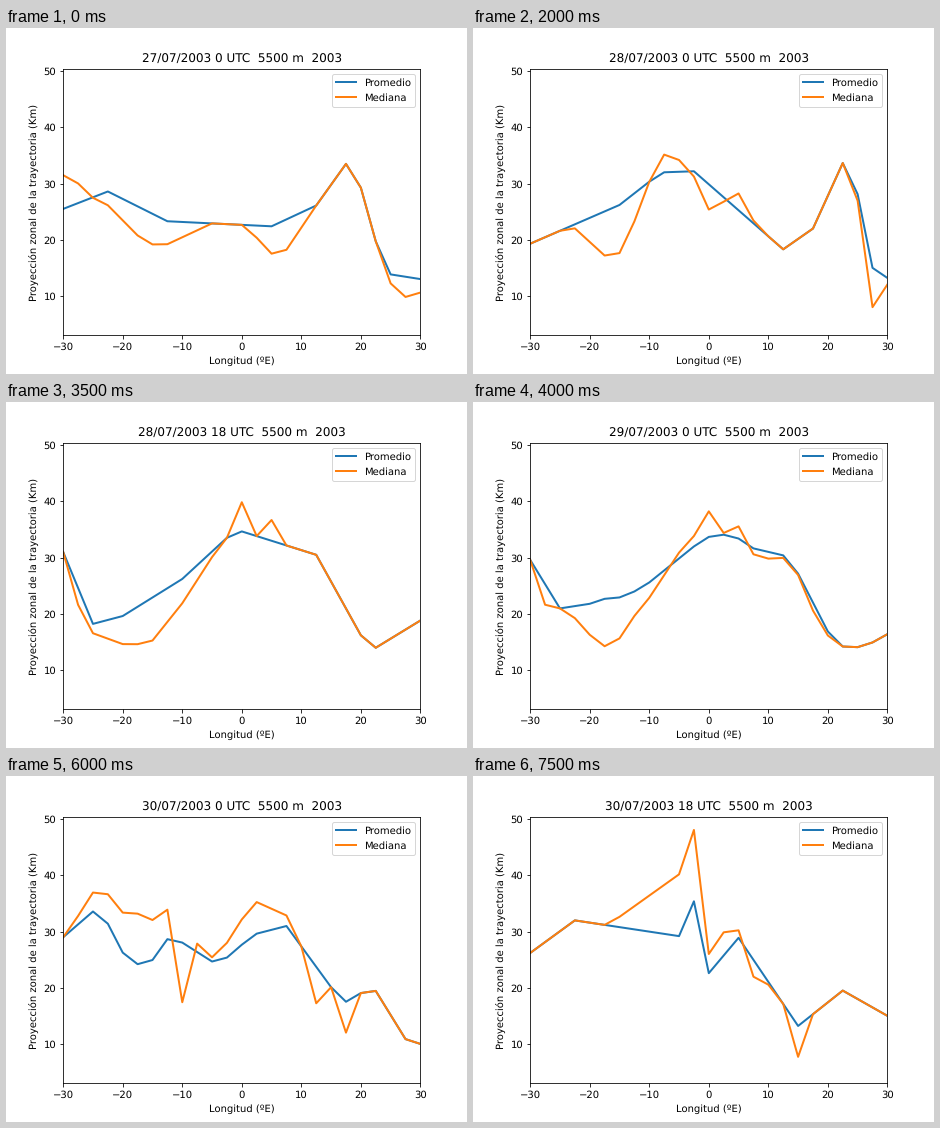
Recreate the animation shown at these times as a matplotlib script. Size 461 by 346 pixels, loop 8 s.

```python
import numpy as np
import matplotlib.pyplot as plt
from matplotlib.animation import FuncAnimation

W, H, DPI = 461, 346, 72
FRAMES, STEP_MS = 16, 500

plt.rcParams.update({"font.family": "DejaVu Sans", "text.hinting": "none"})
lon = np.linspace(-30, 30, 25)
steps, means, medians = [], [], []


def tent(center, height, reach):
    """Triangular bump that falls to zero at the given reach."""
    return height * np.clip(1 - abs(lon - center) / reach, 0, None)


def pose(step, outline, *bumps):
    """Mean follows a few (lon, km) points; the median departs from it in bumps."""
    mean = np.interp(lon, *zip(*outline))
    steps.append(step)
    means.append(mean)
    medians.append(mean + sum(tent(*b) for b in bumps))


pose(0, [(-30, 25.5), (-22.5, 28.6), (-12.5, 23.3), (5, 22.4), (12.5, 26.1),
         (18.5, 35), (24, 14), (30, 13)],
     (-30, 6, 6), (-16, -6, 11), (6.5, -6.5, 6), (28, -4, 5))
pose(2, [(-30, 23.6), (-17.5, 25.3), (-11.5, 30.3), (-5, 24.9), (10, 21),
         (21, 34.5), (27, 10), (30, 10)],
     (-18, -8, 11), (2.5, 3.5, 5), (7.5, -3, 4), (20, 5.5, 5))
pose(4, [(-30, 19.3), (-15, 26.2), (-8, 32), (-2.5, 32.2), (12.5, 18.3),
         (17.5, 22), (23.5, 36), (27.5, 15), (30, 13.2)],
     (-16, -10, 7), (-7, 3.5, 5), (0, -4.5, 3.5), (5, 3, 3), (27.5, -7, 3))
pose(7, [(-30, 31), (-25, 18.2), (-20, 19.6), (-10, 26.2), (-1, 35),
         (12.5, 30.5), (21.5, 13.3), (30, 18.8)],
     (-27.5, -3, 2.5), (-15.5, -8, 12), (0, 5.2, 2.5), (5, 3.7, 2.5))
pose(10, [(-30, 26.8), (-18, 26), (-14, 21.9), (-2.5, 28.9), (3.75, 36),
          (7.5, 30.6), (15, 30), (20, 18.2), (26, 9.6), (30, 11.5)],
     (-27.5, -5, 2.5), (-24.5, 4, 3), (-17.5, -12, 5.5), (-3.5, 6.5, 7),
     (9, -4.5, 5), (18, -5, 3.5))
pose(12, [(-30, 29), (-24, 34.5), (-19, 24.2), (-15.5, 24.2), (-12, 29.4),
          (-4, 24), (2, 29.5), (7.5, 31), (17, 17.2), (22, 20.3), (28, 10)],
     (-17.5, 9, 12), (-10, -14, 2.5), (2, 6, 8), (12.5, -6.5, 2.5),
     (17.5, -5.5, 2.5))
pose(15, [(-30, 26.2), (-22.5, 32), (-5, 29.2), (-2.5, 35.4), (0, 22.6),
          (5, 28.9), (15, 13.2), (22.5, 19.5), (30, 15)],
     (-5, 11, 12), (-2.5, 4, 2.5), (0, -3, 2.5), (7.5, -3, 3), (15, -5.5, 2.5))


def blend(curves, step):
    """Interpolate between the two nearest poses."""
    return [np.interp(step, steps, column) for column in zip(*curves)]


fig, ax = plt.subplots(figsize=(W / DPI, H / DPI), dpi=DPI)
fig.subplots_adjust(left=57.2 / W, right=414.4 / W,
                    top=1 - 41.3 / H, bottom=1 - 307.4 / H)
mean_line, = ax.plot(lon, means[0], lw=2, label="Promedio")
median_line, = ax.plot(lon, medians[0], lw=2, label="Mediana")
ax.set(xlim=(-30, 30), ylim=(2.97, 50.36), yticks=range(10, 51, 10),
       xlabel="Longitud (ºE)",
       ylabel="Proyección zonal de la trayectoria (Km)")
ax.legend(loc="upper right")
title = ax.set_title("")


def update(i):
    day, quarter = divmod(i, 4)
    title.set_text(f"{27 + day}/07/2003 {6 * quarter} UTC  5500 m  2003")
    mean_line.set_ydata(blend(means, i))
    median_line.set_ydata(blend(medians, i))
    return mean_line, median_line, title


anim = FuncAnimation(fig, update, frames=FRAMES, interval=STEP_MS,
                     repeat=True, repeat_delay=0, blit=False)
plt.show()
```
